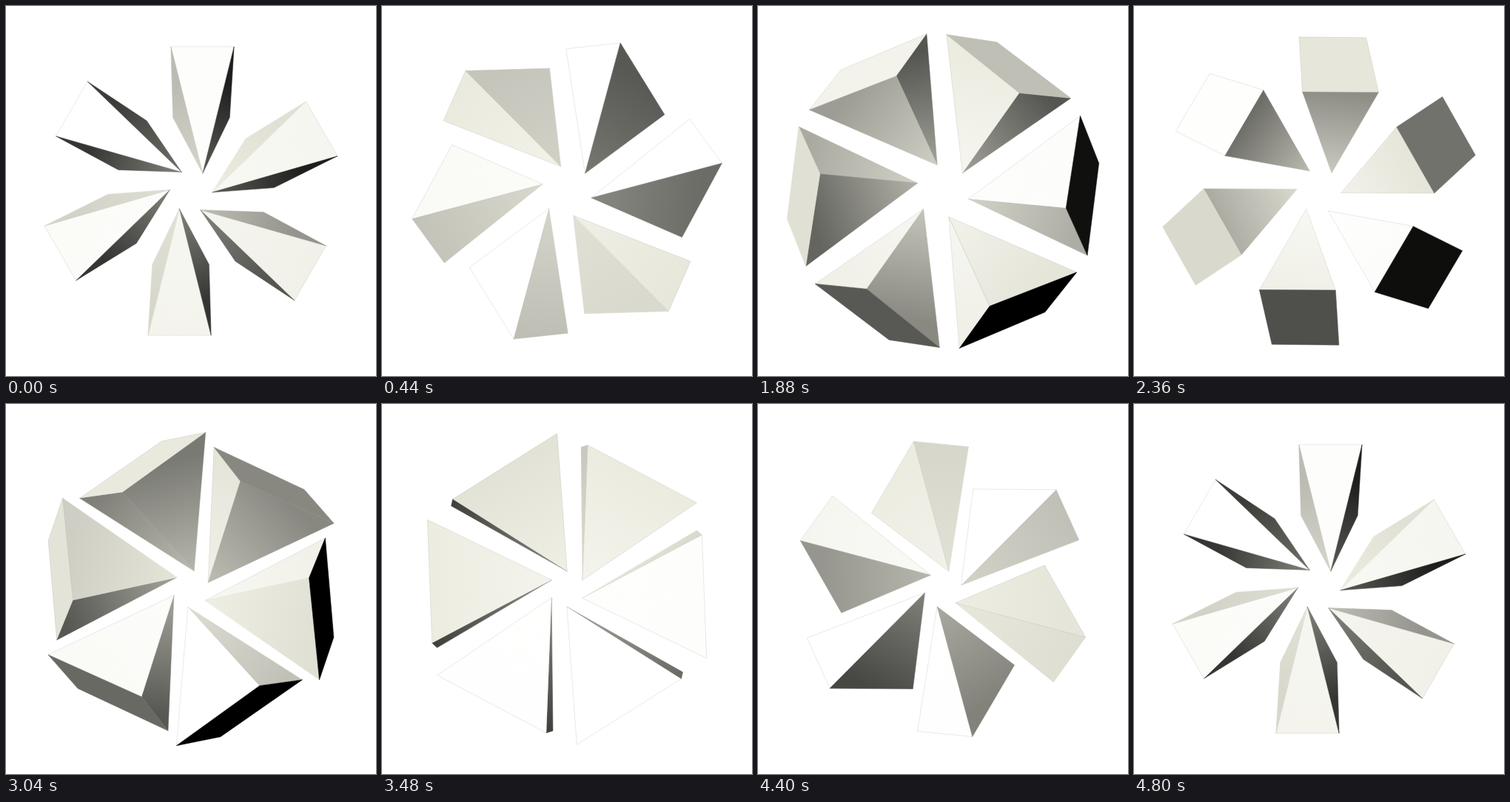
These frames come from a looping animation (500x500 px, 4.84 s). An HTML page with a canvas:

```html
<!DOCTYPE html>
<html lang="en">
<head>
<meta charset="utf-8">
<title>Turning pyramids</title>
<style>
  html, body { margin: 0; width: 100%; height: 100%; overflow: hidden; background: #fff; }
  canvas { display: block; width: 500px; height: 500px; }
</style>
</head>
<body>
<canvas id="stage" width="500" height="500"></canvas>
<script>
const ctx = document.getElementById('stage').getContext('2d');
const STEP = 40, STEPS = 121;
const EYE = 1148;     // viewer distance
const AXIS = 16;      // sideways shift of each spin axis
const KEY = [-155, 125, -330];  // key light, direction times strength

// One pyramid: x across, y outward along the spin axis, z away from the viewer
const points = [
  [-44, 201.2, 36], [44, 201.2, 36],
  [44, 114, 170], [-44, 114, 170],
  [0, 24, 16]
];
const sub = (a, b) => a.map((v, i) => v - b[i]);
const dot = (a, b) => a[0] * b[0] + a[1] * b[1] + a[2] * b[2];
const cross = (a, b) => [
  a[1] * b[2] - a[2] * b[1],
  a[2] * b[0] - a[0] * b[2],
  a[0] * b[1] - a[1] * b[0]
];
const unit = a => { const l = Math.hypot(...a); return a.map(v => v / l); };
const mean = list => [0, 1, 2].map(i => list.reduce((s, p) => s + p[i], 0) / list.length);
const clamp = (v, lo, hi) => Math.max(lo, Math.min(hi, v));

const middle = mean(points);
const faces = [[4, 0, 1], [4, 2, 3], [4, 1, 2], [4, 3, 0], [0, 1, 2, 3]].map(ids => {
  const [a, b, c] = ids.map(i => points[i]);
  const n = unit(cross(sub(b, a), sub(c, a)));
  const out = dot(n, sub(a, middle)) > 0 ? 1 : -1;
  return { ids, normal: n.map(v => v * out) };
});

function turn([x, y, z], spin, ring, shift) {
  const c = Math.cos(spin), s = Math.sin(spin);
  const u = shift + x * c + z * s;
  const w = z * c - x * s;
  const rc = Math.cos(ring), rs = Math.sin(ring);
  return [u * rc + y * rs, y * rc - u * rs, w];
}

function project([x, y, z]) {
  const k = EYE / (EYE + z);
  return [250 + x * k, 250 - y * k];
}

// Key light with soft highlights, screened with a glow from the middle.
// Returns the levels at the first corner and at the opposite edge.
function light(n, at) {
  let key = Math.max(0, dot(n, KEY));
  if (key > 200) key = 200 + (key - 200) * .37;
  key = Math.min(255, key);
  const inward = -n[0] * at[0] - n[1] * at[1];
  const glow = clamp(.31 + .004 * inward, 0, .58);
  const spread = Math.min(.15, glow / 2);
  return [spread, -spread].map(d => key + (255 - key) * (glow + d));
}

function tone(v) {
  const blue = v > 235 ? v - 12 + (v - 235) * .6 : v * .95;
  return `rgb(${Math.round(v)},${Math.round(v)},${Math.round(blue)})`;
}

function drawFace(face, pts, spin, ring) {
  const world = face.ids.map(i => pts[i]);
  const n = turn(face.normal, spin, ring, 0);
  const at = mean(world);
  if (dot(n, sub(at, [0, 0, -EYE])) >= 0) return;

  const flat = world.map(project);
  const [near, far] = light(n, at);
  const end = project(mean(world.slice(1)));
  const fill = ctx.createLinearGradient(...flat[0], ...end);
  fill.addColorStop(0, tone(near));
  fill.addColorStop(1, tone(far));

  ctx.beginPath();
  flat.forEach(p => ctx.lineTo(...p));
  ctx.closePath();
  ctx.fillStyle = fill;
  ctx.fill();
  ctx.strokeStyle = far > 225 ? 'rgba(130,130,122,.35)' : fill;
  ctx.lineWidth = .5;
  ctx.stroke();
}

function draw(spin) {
  ctx.fillStyle = '#fff';
  ctx.fillRect(0, 0, 500, 500);
  for (let i = 0; i < 6; i++) {
    const ring = i * Math.PI / 3;
    const pts = points.map(p => turn(p, spin, ring, AXIS));
    faces.forEach(face => drawFace(face, pts, spin, ring));
  }
}

const start = performance.now();
function tick() {
  const step = Math.floor((performance.now() - start) / STEP) % STEPS;
  draw(step * Math.PI / 60);
  requestAnimationFrame(tick);
}
tick();
</script>
</body>
</html>
```
